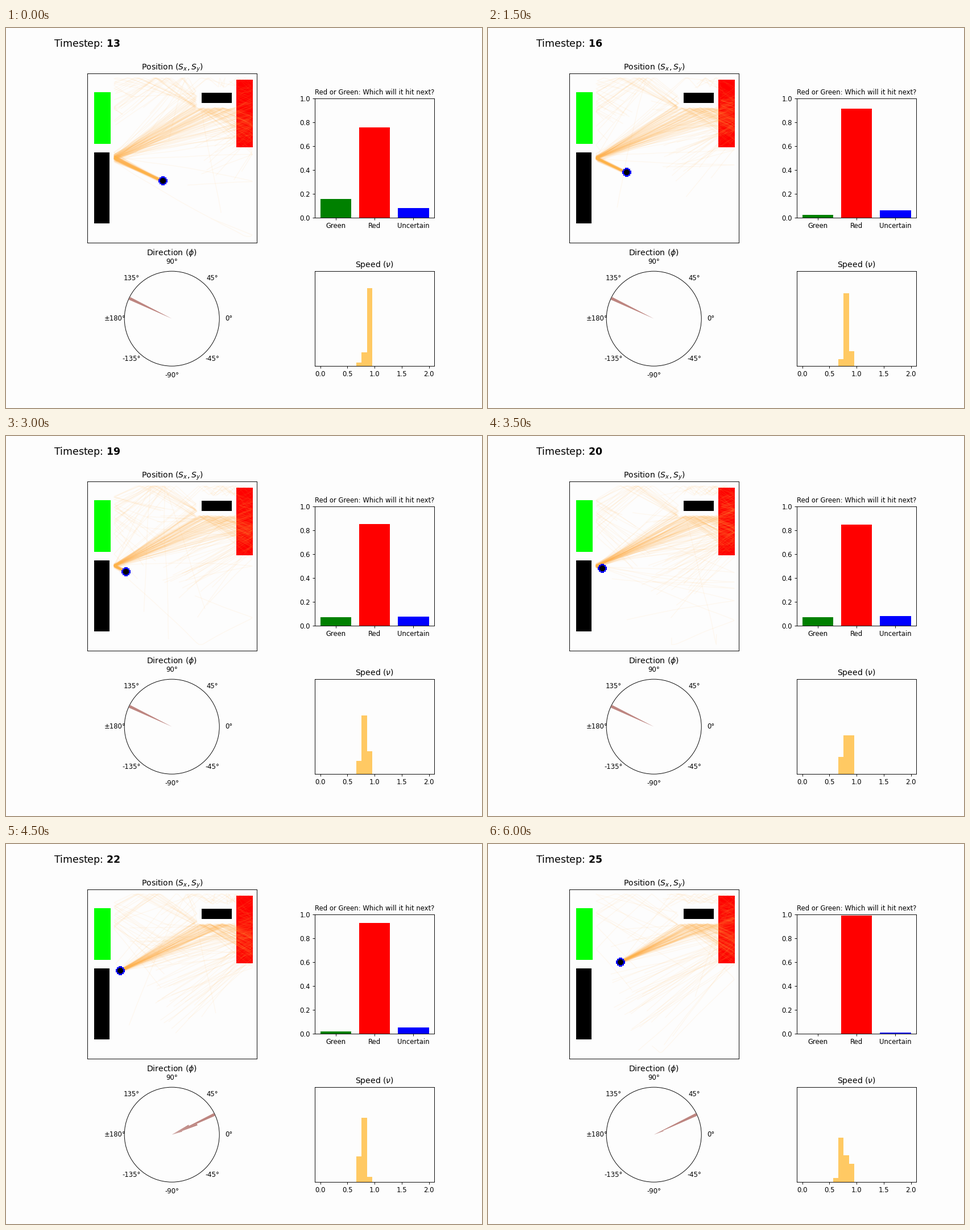
Write a matplotlib script that moves like this. It is 837 px wide and 669 px high and loops after 6.5 s.

```python
import numpy as np
import matplotlib.pyplot as plt
from matplotlib.animation import FuncAnimation
from matplotlib.collections import LineCollection
from matplotlib.patches import Circle, Rectangle, Wedge

W, H, DPI = 837, 669, 83.7
STEPS, STEP_MS = 13, 500
PAPER = "#fdfdfd"
HEADING = np.radians(25.5)
BOUNCE_STEP = 8
BIN = 3.6  # degrees per direction bin

# Values at known steps; those between are interpolated.
KEYS = [0, 1, 3, 5, 7, 9, 12]
GREEN = [.16, .13, .027, .07, .07, .02, 0]
RED = [.76, .79, .913, .86, .85, .93, .99]
UNSURE = [.08, .08, .062, .07, .08, .052, .01]
SPEED = [[0, 0, 0, 0, 0, 0, .045],
         [.035, .09, .075, .095, .18, .27, .47],
         [.145, .57, .77, .83, .41, .675, .285],
         [.82, .335, .155, .075, .41, .053, .195]]

plt.rcParams.update({"font.family": "DejaVu Sans", "font.size": 10,
                     "axes.titlesize": 12, "axes.facecolor": PAPER})
fig = plt.figure(figsize=((W + .01) / DPI, (H + .01) / DPI), dpi=DPI,
                 facecolor=PAPER)


def panel(x0, y0, x1, y1, **kw):
    """Axes placed by pixel corners, y counted from the top."""
    return fig.add_axes([x0 / W, 1 - y1 / H, (x1 - x0) / W, (y1 - y0) / H], **kw)


def at(values, k):
    return np.interp(k, KEYS, values)


def ball_at(k):
    return 189.4 + 10.75 * abs(k - BOUNCE_STEP), 270 - 5.15 * k


def simulate(k, count=130, steps=80, stride=6):
    """Noisy bouncing paths that start at the ball."""
    rng = np.random.default_rng(40 + k)
    wild = rng.random(count) < .03 + .7 * at(GREEN, k)
    spread = np.where(wild, .45, .08)
    bx, by = ball_at(k)
    x = bx + rng.normal(0, 1, count)
    y = by + rng.normal(0, 1.4, count)
    if k < BOUNCE_STEP:
        angle = np.pi - HEADING + rng.normal(0, .015, count)
    else:
        angle = HEADING + rng.normal(0, 1, count) * spread * .9
    left = 190 + rng.uniform(0, 4, count)
    fuel = steps - rng.integers(0, 14, count)
    absorbed = rng.random(count) < .5
    points = [np.column_stack([x, y])]
    for _ in range(steps):
        px, py = x, y
        move = stride * (fuel > 0)
        x = px + move * np.cos(angle)
        y = py - move * np.sin(angle)

        boxed = (x > 336) & (x < 405) & (y > 106) & (y < 140)
        side = boxed & ((px <= 336) | (px >= 405))
        flat = boxed & ~side
        x, y = np.where(boxed, px, x), np.where(boxed, py, y)

        c, s = np.cos(angle), np.sin(angle)
        side |= ((x < left) & (c < 0)) | ((x > 433) & (c > 0))
        flat |= ((y < 88) & (s > 0)) | ((y > 367) & (s < 0))
        x, y = np.clip(x, 190, 433), np.clip(y, 88, 367)

        angle = np.where(side, np.pi - angle, angle)
        angle = np.where(flat, -angle, angle)
        scatter = np.where(x > 425, .2, spread)
        kick = np.where(side | flat, scatter, .012)
        angle = angle + rng.normal(0, 1, count) * kick

        in_red = (x > 405) & (y < 210) & absorbed
        limit = rng.integers(3, 14, count)
        fuel = np.where(in_red, np.minimum(fuel, limit), fuel) - 1
        points.append(np.column_stack([x, y]))
    return np.stack(points, axis=1)


# Position
arena = panel(143.2, 80.2, 441.2, 378.2, xticks=[], yticks=[])
arena.set_title("Position $(S_x, S_y)$")
for x0, y0, x1, y1, color in [(155, 113, 184.4, 203.6, "#00ff00"),
                              (155, 219, 182, 343.6, "black"),
                              (344, 114, 396.6, 132, "black"),
                              (405, 91, 433.6, 209.6, "red")]:
    arena.add_patch(Rectangle((x0, y0), x1 - x0, y1 - y0, color=color, lw=0))
offsets = np.arange(10) - 4.5
cell = np.hypot(*np.meshgrid(offsets, offsets))
sprite = np.zeros((10, 10, 4))
sprite[cell < 5] = (0, 0, 1, 1)
sprite[cell < 3] = (0, 0, 0, 1)
ball = arena.imshow(sprite, interpolation="nearest", aspect="auto", zorder=4)
arena.set(xlim=(143.2, 441.2), ylim=(378.2, 80.2))
trails = arena.add_collection(
    LineCollection([], colors="#fdb347", alpha=.075, linewidths=1.2, zorder=3),
    autolim=False)

# Outcome bars
chart = panel(543.2, 124.2, 753.2, 334.2)
bars = chart.bar(["Green", "Red", "Uncertain"], [0, 0, 0],
                 color=["green", "red", "blue"])
chart.set(ylim=(0, 1), xlim=(-.54, 2.54))
chart.set_title("Red or Green: Which will it hit next?", fontsize=10)

# Direction
dial = panel(158.2, 378.2, 425.2, 645.2, xlim=(-133.5, 133.5),
             ylim=(-133.5, 133.5))
dial.axis("off")
dial.add_patch(Circle((0, 0), 83.5, fill=False, lw=.8))
for deg in range(-135, 181, 45):
    label = "±180°" if deg == 180 else f"{deg}°"
    dial.text(100 * np.cos(np.radians(deg)), 100 * np.sin(np.radians(deg)),
              label, ha="center", va="center")
dial.text(0, 112, r"Direction $(\phi)$", ha="center", va="baseline",
          fontsize=12)
wedges = [dial.add_patch(Wedge((0, 0), 1, 0, 1, color="#bd8580", lw=0))
          for _ in range(4)]

# Speed
hist = panel(543.2, 428.2, 753.2, 595.2, yticks=[])
edges = np.linspace(0, 2, 22)
columns = hist.bar(edges[6:10], [0] * 4, width=edges[1], align="edge",
                   color=(1, .788, .39), lw=0)
hist.set(xlim=(-.1, 2.1), ylim=(0, 1), xticks=np.arange(0, 2.1, .5))
hist.set_title(r"Speed $(\nu)$")

clock = fig.text(.1, .95, "", fontsize=15, va="baseline")


def direction_bins(k):
    """Angle and radius of each direction bar."""
    if k < BOUNCE_STEP:
        return [(154.4, 83), (0, 0), (0, 0), (0, 0)]
    fade = np.interp(k, [9, 12], [1, 0])
    main = 25.4
    return [(main, 83), (main - BIN, 18 + 30 * fade),
            (main + BIN, 34 * fade), (main - 2 * BIN, 19 * fade)]


def draw(k):
    clock.set_text(r"Timestep: $\bf{%d}$" % (13 + k))
    x, y = ball_at(k)
    ball.set_extent((x - 7.5, x + 7.5, y + 7.5, y - 7.5))
    trails.set_segments(simulate(k))
    for bar, values in zip(bars, (GREEN, RED, UNSURE)):
        bar.set_height(at(values, k))
    for column, values in zip(columns, SPEED):
        column.set_height(at(values, k))
    for wedge, (angle, radius) in zip(wedges, direction_bins(k)):
        wedge.set_visible(radius > 0)
        wedge.set_radius(max(radius, 1))
        wedge.set_theta1(angle - BIN / 2)
        wedge.set_theta2(angle + BIN / 2)
    return []


anim = FuncAnimation(fig, draw, frames=STEPS, init_func=lambda: draw(0),
                     interval=STEP_MS, repeat=True, repeat_delay=0)
plt.show()
```
